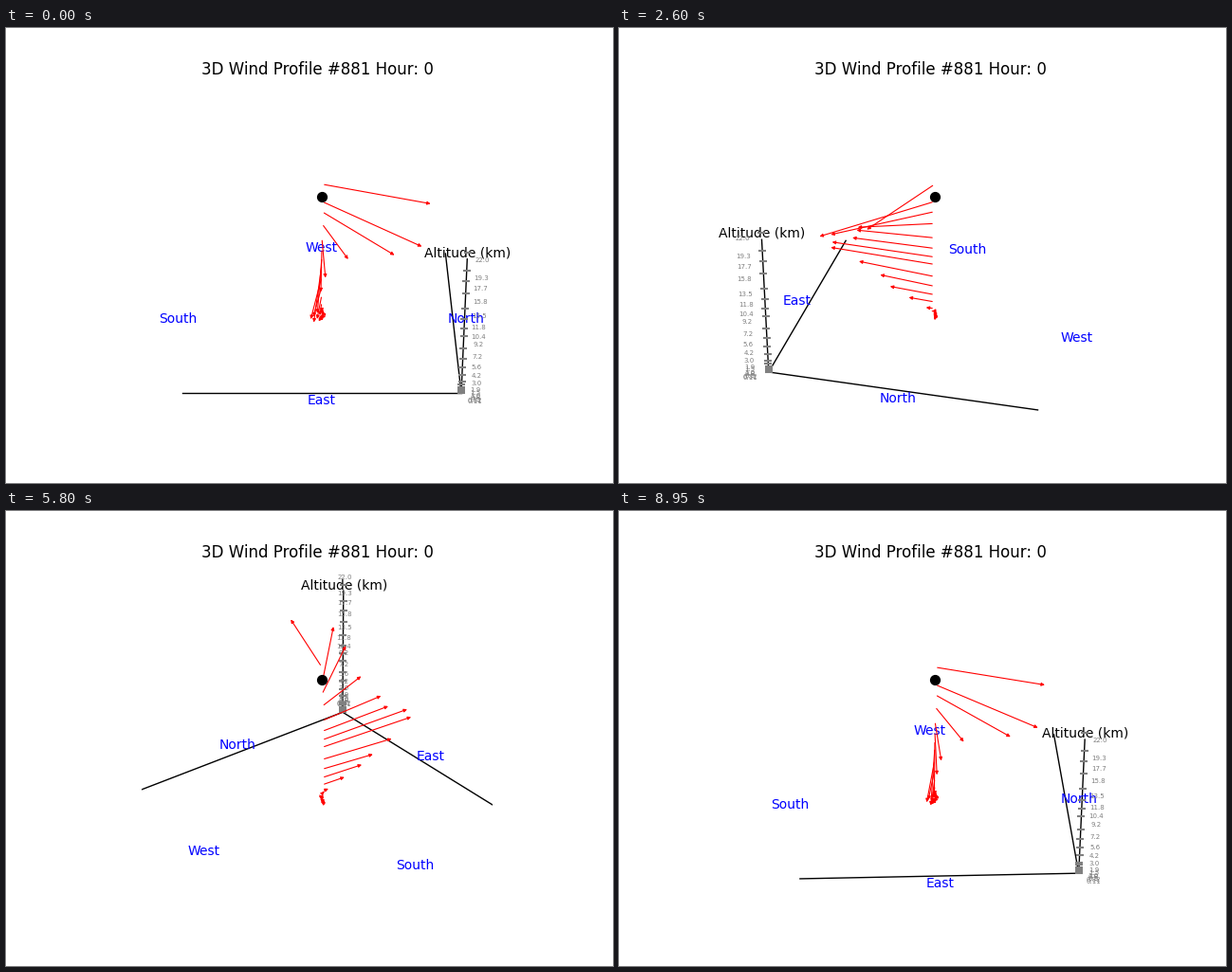
Write a matplotlib script that moves like this. It is 640 px wide and 480 px high and loops after 9000 ms.

```python
import numpy as np
import matplotlib.pyplot as plt
from matplotlib.animation import FuncAnimation
from matplotlib.patches import FancyArrowPatch, Rectangle

W, H, DPI = 640, 480, 100
FRAMES, INTERVAL = 180, 50

# Perspective camera, 30 degrees above the ground
ELEV = np.radians(30)
DIST = 10
VIEW = 369.6
LEFT, BOTTOM = 143.2, 52.8
SCALE = VIEW * DIST / 1.85
CX = LEFT + VIEW * 0.95 / 1.85
CY = BOTTOM + VIEW * 0.95 / 1.85

# Labelled altitudes in km
ALTS = [0.11, 0.32, 0.5, 0.8, 1.0, 1.5, 1.9, 3.0, 4.2, 5.6,
        7.2, 9.2, 10.4, 11.8, 13.5, 15.8, 17.7, 19.3, 22.0]
LOW, HIGH = ALTS[0], ALTS[-1]
HALF_HEIGHT = 0.4114
CORNER = 0.706
OUTER = 1.1 * CORNER


def bump(alt, mid, width):
    return np.exp(-((alt - mid) / width) ** 2)


def wind(alt):
    """Eastward and northward wind: a westerly jet that veers north on top."""
    east = np.interp(alt, [1.2, 4.2, 5.6, 9.2, 10.4, 11.8, 15.8, 17.7, 19.3, 22],
                     [0, 0.27, 0.33, 0.602, 0.588, 0.468, 0.393, 0.467, 0.483, 0.217])
    north = 0.57 / (1 + np.exp((17 - alt) / 1.08))
    north += 0.025 * bump(alt, 1, 0.8) - 0.06 * bump(alt, 7.2, 3.4)
    return east, north


def project(east, north, alt, azim):
    """Pixel position (y up) of a point seen from the given azimuth."""
    c, s = np.cos(azim), np.sin(azim)
    side = north * c - east * s
    near = east * c + north * s
    z = HALF_HEIGHT * (2 * (alt - LOW) / (HIGH - LOW) - 1)
    up = z * np.cos(ELEV) - near * np.sin(ELEV)
    depth = DIST - near * np.cos(ELEV) - z * np.sin(ELEV)
    return CX + SCALE * side / depth, CY + SCALE * up / depth


fig = plt.figure(figsize=(W / DPI, H / DPI), dpi=DPI)
ax = fig.add_axes([0, 0, 1, 1])
ax.set_xlim(0, W)
ax.set_ylim(0, H)
ax.axis("off")

ax.text(LEFT + VIEW / 2, BOTTOM + VIEW + 8.33, "3D Wind Profile #881 Hour: 0",
        fontsize=12, ha="center", va="baseline")

# Three axis lines meeting in the north-east corner
pane = Rectangle((LEFT, BOTTOM), VIEW, VIEW, transform=ax.transData)
origin = (CORNER, CORNER, LOW)
ends = [(-CORNER, CORNER, LOW), (CORNER, -CORNER, LOW), (CORNER, CORNER, HIGH - 1)]
lines = []
for _ in ends:
    line, = ax.plot([], [], color="black", lw=1, zorder=2)
    line.set_clip_path(pane)
    lines.append(line)

# Every label keeps its own point in space and a pixel offset
labels = []


def add_label(point, text, size, color, shift=(0, 0)):
    label = ax.text(0, 0, text, fontsize=size, color=color,
                    ha="center", va="center", zorder=3)
    labels.append((label, point, shift))


add_label((0, OUTER, LOW), "North", 10, "blue")
add_label((0, -OUTER, LOW), "South", 10, "blue")
add_label((OUTER, 0, LOW), "East", 10, "blue")
add_label((-OUTER, 0, LOW), "West", 10, "blue")
add_label((CORNER, CORNER, HIGH), "Altitude (km)", 10, "black", (0.4, -0.7))
for alt in ALTS:
    add_label((OUTER, OUTER, alt), str(alt), 5, "gray", (-1, -0.6))

ticks, = ax.plot([], [], ls="none", marker="_", ms=6, mew=1.5,
                 color="gray", zorder=4)

ax.scatter(*project(0, 0, HIGH - 2, 0), s=50, color="black", zorder=6)

arrows = []
for alt in ALTS:
    arrow = FancyArrowPatch((0, 0), (1, 1), arrowstyle="-|>", mutation_scale=5,
                            lw=0.8, color="red", zorder=7 if alt == HIGH else 5)
    ax.add_patch(arrow)
    arrows.append(arrow)


def update(frame):
    azim = 2 * np.pi * frame / FRAMES
    start = project(*origin, azim)
    for line, end in zip(lines, ends):
        line.set_data(*zip(start, project(*end, azim)))
    for label, point, (dx, dy) in labels:
        x, y = project(*point, azim)
        label.set_position((x + dx, y + dy))
    ticks.set_data(*project(CORNER, CORNER, np.array(ALTS), azim))
    for arrow, alt in zip(arrows, ALTS):
        arrow.set_positions(project(0, 0, alt, azim),
                            project(*wind(alt), alt, azim))
    return []


anim = FuncAnimation(fig, update, frames=FRAMES, interval=INTERVAL,
                     repeat=True, repeat_delay=0, blit=False)
plt.show()
```
